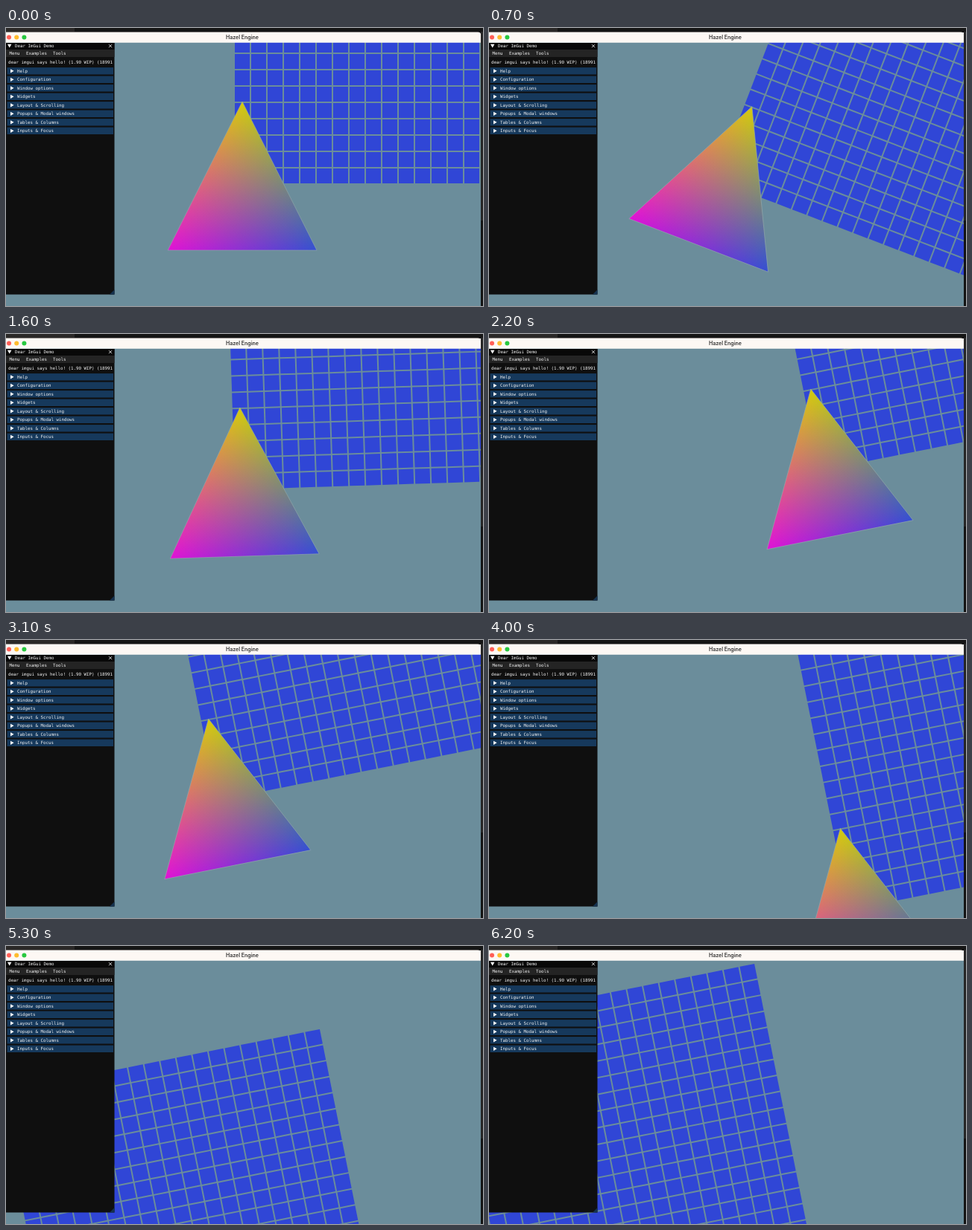
An HTML page with a canvas for the animation above (6300 ms loop, 640 px wide and 374 px high).

```html
<!DOCTYPE html>
<html lang="en">
<head>
<meta charset="utf-8">
<title>Hazel Engine</title>
<style>
  html, body { margin: 0; width: 100%; height: 100%; overflow: hidden; background: #161616; }
  canvas { display: block; }
</style>
</head>
<body>
<canvas id="stage" width="640" height="374"></canvas>
<script>
const ctx = document.getElementById('stage').getContext('2d');
const LOOP = 6300, STEP = 100;
const MONO = '5.82px "DejaVu Sans Mono", monospace';

// Camera poses: time in ms, rotation in degrees, world offset in pixels.
const poses = [
  [0, 0, 0, 0],
  [1200, 36, 0, 0],
  [1700, -11.3, 0, 0],
  [2200, -11.3, 137, 0],
  [2700, -11.3, -26.3, 0],
  [3300, -11.3, -26.3, 0],
  [4000, -11.3, 140.7, 183.6],
  [4700, -11.3, -280, 335],
  [4900, -11.3, -280, 335],
  [5300, -11.3, -309, 363],
  [6200, -11.3, -355.4, 264]
];

function poseAt(time) {
  const next = poses.findIndex(p => p[0] > time);
  if (next < 0) return poses[poses.length - 1].slice(1);
  const a = poses[next - 1], b = poses[next];
  const k = (time - a[0]) / (b[0] - a[0]);
  return [1, 2, 3].map(i => a[i] + (b[i] - a[i]) * k);
}

function rect(x, y, w, h, color) {
  ctx.fillStyle = color;
  ctx.fillRect(x, y, w, h);
}

function polygon(points, color) {
  ctx.beginPath();
  points.forEach(([x, y]) => ctx.lineTo(x, y));
  ctx.closePath();
  ctx.fillStyle = color;
  ctx.fill();
}

function text(str, x, y, color = '#f4f4f4') {
  ctx.fillStyle = color;
  ctx.fillText(str, x, y);
}

function drawGrid() {
  for (let row = 0; row < 20; row++)
    for (let col = 0; col < 20; col++)
      rect(col * 22 - 10, -row * 22 - 10, 20, 20, '#3046d6');
}

// Three additive gradients, each fading from a corner to the opposite side.
function drawTriangle() {
  const corners = [[0, -100], [-100, 100], [100, 100]];
  const colors = ['#d4cc0c', '#e012d6', '#3450d2'];
  polygon(corners, '#000');
  ctx.globalCompositeOperation = 'lighter';
  corners.forEach(([x, y], i) => {
    const [bx, by] = corners[(i + 1) % 3], [cx, cy] = corners[(i + 2) % 3];
    const dx = cx - bx, dy = cy - by;
    const k = ((x - bx) * dx + (y - by) * dy) / (dx * dx + dy * dy);
    const fade = ctx.createLinearGradient(x, y, bx + dx * k, by + dy * k);
    fade.addColorStop(0, colors[i]);
    fade.addColorStop(1, '#000');
    polygon(corners, fade);
  });
  ctx.globalCompositeOperation = 'source-over';
  ctx.strokeStyle = 'rgba(150,170,172,.75)';
  ctx.lineWidth = 0.8;
  ctx.stroke();
}

function drawScene(time) {
  const [angle, x, y] = poseAt(time);
  ctx.save();
  ctx.beginPath();
  ctx.rect(0, 19, 637, 355);
  ctx.clip();
  rect(0, 19, 637, 355, '#6b8d9b');
  ctx.translate(317, 199);
  ctx.rotate(angle * Math.PI / 180);
  ctx.translate(x, y);
  drawGrid();
  drawTriangle();
  ctx.restore();
}

function drawWindow() {
  rect(0, 0, 640, 6, '#151515');
  rect(0, 0, 92, 5, '#2a2827');
  rect(637, 5, 3, 254, '#262626');
  rect(637, 259, 3, 115, '#141414');
  ctx.beginPath();
  ctx.roundRect(-5, 5.5, 642, 14.2, [0, 4, 0, 0]);
  ctx.fillStyle = '#fdf8f4';
  ctx.fill();
  ['#ff5f57', '#febc2e', '#28c840'].forEach((color, i) => {
    ctx.beginPath();
    ctx.arc(4 + i * 10.2, 12.6, 3, 0, 7);
    ctx.fillStyle = color;
    ctx.fill();
  });
  ctx.font = '600 7px Inter, sans-serif';
  ctx.textAlign = 'center';
  text('Hazel Engine', 317, 12.7, '#333');
  ctx.textAlign = 'left';
}

function drawPanel() {
  rect(0, 20, 145.5, 338.5, '#0f0f0f');
  rect(0, 20, 145.5, 9, '#080808');
  rect(0, 29, 145.5, 10, '#242424');
  polygon([[139, 358.5], [145.5, 358.5], [145.5, 352]], '#15324f');
  polygon([[2, 21.8], [7.4, 21.8], [4.7, 26.4]], '#fff');
  ctx.font = MONO;
  text('Dear ImGui Demo', 12, 24.6);
  ctx.strokeStyle = '#fff';
  ctx.lineWidth = 0.8;
  ctx.beginPath();
  ctx.moveTo(138, 22.2); ctx.lineTo(142, 26.2);
  ctx.moveTo(142, 22.2); ctx.lineTo(138, 26.2);
  ctx.stroke();
  text('Menu', 4.5, 34.2);
  text('Examples', 27, 34.2);
  text('Tools', 63, 34.2);
  text('dear imgui says hello! (1.90 WIP) (18991', 3, 46);
  ['Help', 'Configuration', 'Window options', 'Widgets', 'Layout & Scrolling',
   'Popups & Modal windows', 'Tables & Columns', 'Inputs & Focus'].forEach((label, i) => {
    const y = 57.8 + i * 11.5;
    rect(1.5, y - 4.7, 142.5, 9.4, '#16395c');
    polygon([[6, y - 2.6], [10.6, y], [6, y + 2.6]], '#fff');
    text(label, 15, y + 0.2);
  });
}

function frame() {
  const time = Math.floor(performance.now() % LOOP / STEP) * STEP;
  ctx.textBaseline = 'middle';
  drawScene(time);
  drawWindow();
  drawPanel();
  requestAnimationFrame(frame);
}
frame();
</script>
</body>
</html>
```
